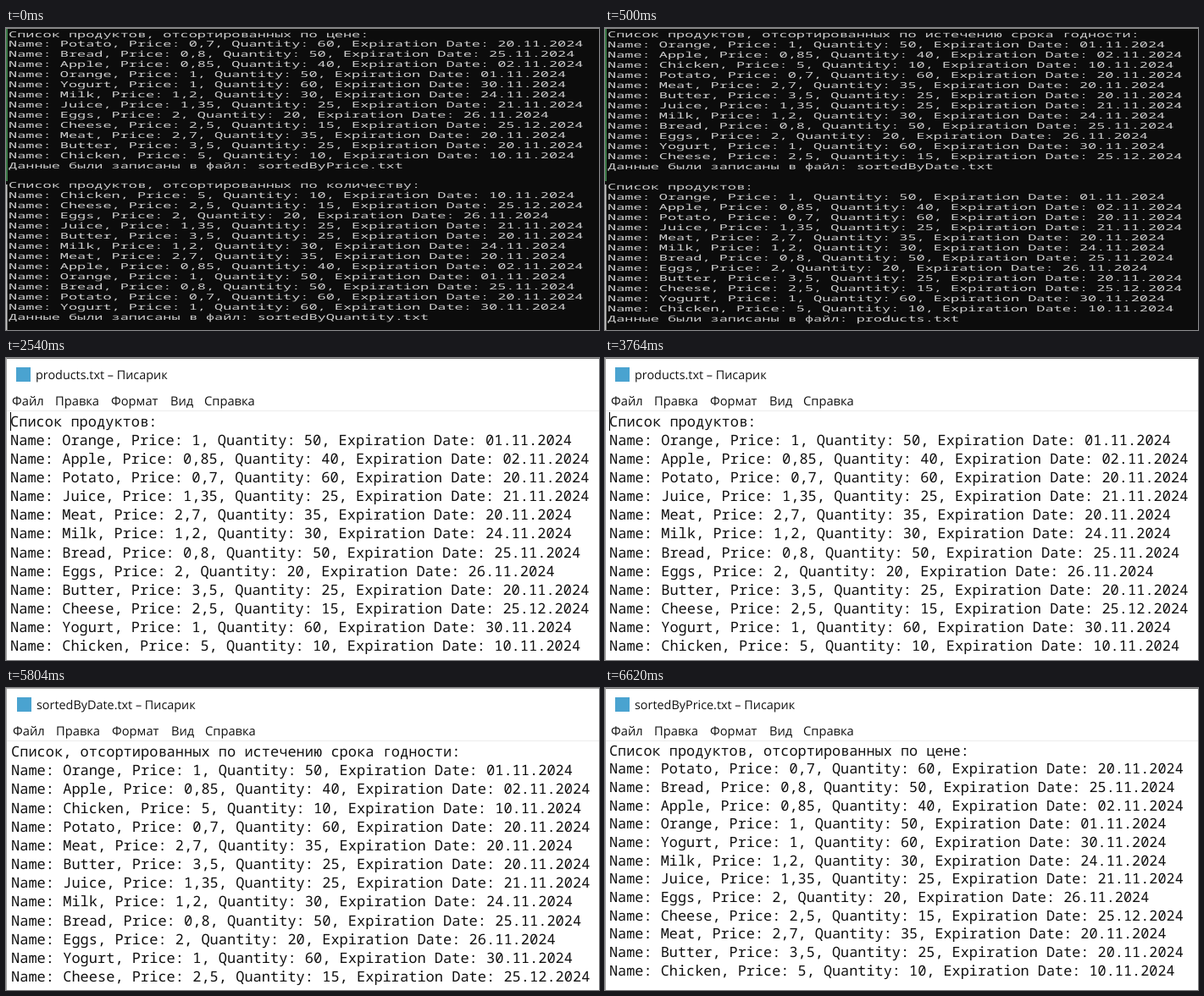
Recreate the animation shown at these times as an HTML page. Size 700x357 px, loop 8000 ms.

```html
<!DOCTYPE html>
<html lang="ru">
<head>
<meta charset="utf-8">
<style>
  html, body { margin: 0; width: 100%; height: 100%; overflow: hidden; background: #fff; }
  svg { display: block; width: 100vw; height: 100vh; }
  text { text-rendering: geometricPrecision; white-space: pre; }
  .mono { font-family: "Noto Sans Mono", "DejaVu Sans Mono", monospace; }
  .ui { font-family: "Open Sans", "Noto Sans", sans-serif; fill: #111; }
</style>
</head>
<body>
<svg id="stage" viewBox="0 0 700 357" preserveAspectRatio="none"></svg>
<script>
const products = [
  ["Orange", 1, 50, "01.11"], ["Apple", 0.85, 40, "02.11"],
  ["Potato", 0.7, 60, "20.11"], ["Juice", 1.35, 25, "21.11"],
  ["Meat", 2.7, 35, "20.11"], ["Milk", 1.2, 30, "24.11"],
  ["Bread", 0.8, 50, "25.11"], ["Eggs", 2, 20, "26.11"],
  ["Butter", 3.5, 25, "20.11"], ["Cheese", 2.5, 15, "25.12"],
  ["Yogurt", 1, 60, "30.11"], ["Chicken", 5, 10, "10.11"],
];
const dayKey = p => p[3].slice(3) * 100 + +p[3].slice(0, 2);
const sorted = key => [...products].sort((a, b) => key(a) - key(b));
const byPrice = sorted(p => p[1]);
const byQuantity = sorted(p => p[2]);
const byDate = sorted(dayKey);

const listing = (title, items) => [title, ...items.map(([name, price, count, day]) =>
  `Name: ${name}, Price: ${String(price).replace(".", ",")}, Quantity: ${count}, Expiration Date: ${day}.2024`)];
const report = (title, items, file) =>
  [...listing(title, items), `Данные были записаны в файл: ${file}`];

const rect = (x, y, w, h, fill) =>
  `<rect x="${x}" y="${y}" width="${w}" height="${h}" fill="${fill}"/>`;
const ui = (x, y, size, s) =>
  `<text class="ui" x="${x}" y="${y}" font-size="${size}">${s}</text>`;

// Rows of monospaced text; advance is the character pitch, squash flattens the glyphs.
const rows = (lines, x, y, pitch, advance, fill, squash = 1) => lines.map((s, i) =>
  `<text class="mono" font-size="${advance / 0.6}" fill="${fill}"
    transform="translate(${x} ${y + i * pitch}) scale(1 ${squash})">${s}</text>`).join("");

const terminal = (first, second, pitch) =>
  rect(0, 0, 700, 357, "#0c0c0c") +
  rect(0, 0, 700, 1, "#8c8c8c") +
  rect(0, 1, 2, 180, "#3c7a48") +
  rect(0, 185, 1.5, 172, "#c8c8c8") +
  rows([...first, "", ...second], 3, 10.5, pitch, 10.13, "#d0d0d0", 0.57);

const menu = [[7, "Файл"], [58, "Правка"], [124, "Формат"], [194, "Вид"], [234, "Справка"]];
const editor = (file, lines, { x = 5, y = 81, pitch, advance, shift = 0, edge, caret }) =>
  rect(0, 0, 700, 357, "#fff") +
  rect(0, 0, 700, 1, edge) +
  rect(0, 0, 1, 357, "#a0a0a0") +
  rect(12 + shift, 11, 17, 17, "#4aa3d0") +
  ui(35 + shift, 25, 14.4, `${file} – Писарик`) +
  menu.map(([left, s]) => ui(left + shift, 55.5, 14.7, s)).join("") +
  rect(1, 62, 699, 1, "#ececec") +
  rows(lines, x, y, pitch, advance, "#101010") +
  (caret ? rect(5, 64, 1, 22, "#000") : "");

const scenes = [
  [0, terminal(
    report("Список продуктов, отсортированных по цене:", byPrice, "sortedByPrice.txt"),
    report("Список продуктов, отсортированных по количеству:", byQuantity, "sortedByQuantity.txt"),
    11.93)],
  [500, terminal(
    report("Список продуктов, отсортированных по истечению срока годности:", byDate, "sortedByDate.txt"),
    report("Список продуктов:", products, "products.txt"),
    12)],
  [2540, editor("products.txt", listing("Список продуктов:", products),
    { pitch: 22.08, advance: 10.2, edge: "#6b6b6b", caret: true })],
  [4580, editor("sortedByDate.txt",
    listing("Список, отсортированных по истечению срока годности:", byDate),
    { x: 6, pitch: 22.17, advance: 10.21, shift: 1, edge: "#a8a8a8" })],
  [6620, editor("sortedByPrice.txt",
    listing("Список продуктов, отсортированных по цене:", byPrice),
    { y: 79.5, pitch: 21.67, advance: 10.12, edge: "#6b6b6b" })],
];

const stage = document.getElementById("stage");
stage.innerHTML = scenes.map(([, art]) => `<g>${art}</g>`).join("");
const start = performance.now();

function draw(now) {
  const t = Math.max(0, now - start) % 8000;
  const current = scenes.findLastIndex(([from]) => t >= from);
  [...stage.children].forEach((g, i) => g.style.display = i === current ? "" : "none");
  requestAnimationFrame(draw);
}
draw(start);
</script>
</body>
</html>
```
